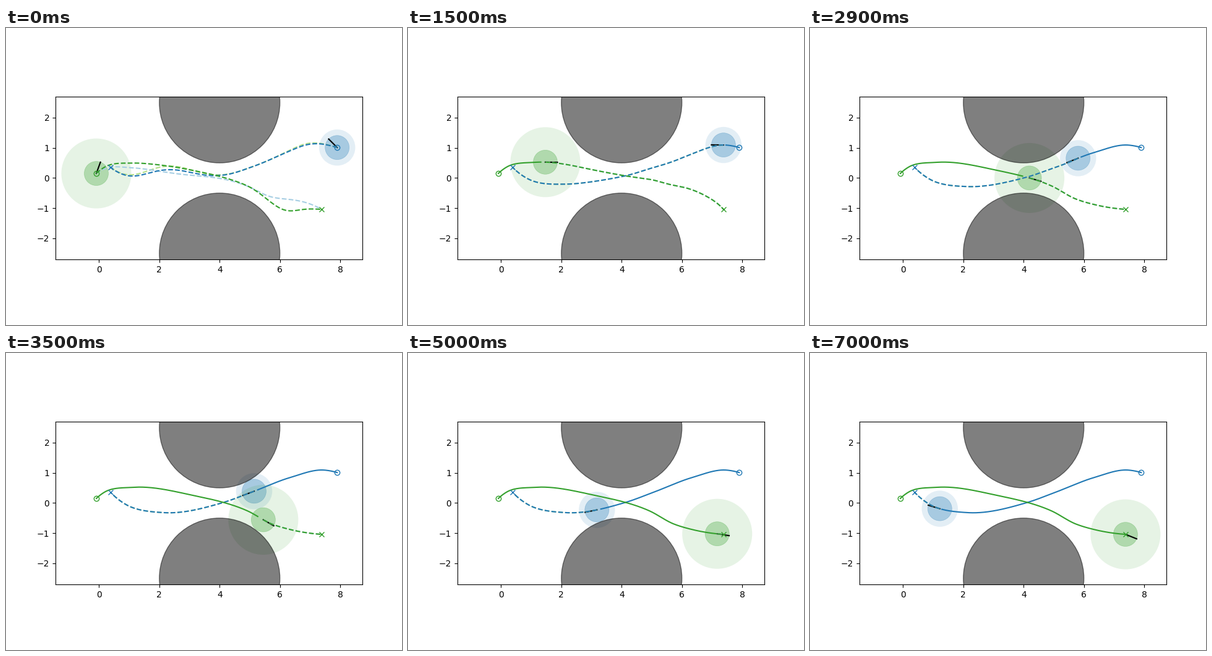
Write a matplotlib script that moves like this. It is 640 px wide and 480 px high and loops after 7100 ms.

```python
import numpy as np
import matplotlib.pyplot as plt
from matplotlib.animation import FuncAnimation
from matplotlib.patches import Circle

FRAMES = 71
INTERVAL = 100
HEADING = 0.4
KEY_FRAMES = 0, 15, 24, 35, 43, 58, 70
SETTLE = 5      # frames until the first plans are replaced
REVISE = 15     # frame from which the settled plans bend to the driven path

BLUE, LIGHT_BLUE = "#1f78b4", "#a6cee3"
GREEN, LIGHT_GREEN = "#33a02c", "#b2df8a"


def spline(knots, values, t):
    """Smooth cubic interpolation with parabolic slopes."""
    knots, values = np.array(knots, float), np.array(values, float)
    slopes = np.gradient(values, knots, edge_order=2)
    i = np.clip(np.searchsorted(knots, t, side="right") - 1, 0,
                len(knots) - 2)
    h = knots[i + 1] - knots[i]
    u = (t - knots[i]) / h
    v = 1 - u
    return (v * v * ((1 + 2 * u) * values[i] + u * h * slopes[i])
            + u * u * ((1 + 2 * v) * values[i + 1] - v * h * slopes[i + 1]))


def curve(points):
    """y as a function of x along a smooth curve through the points."""
    xs, ys = np.array(sorted(points)).T
    length = np.append(0, np.cumsum(np.hypot(np.diff(xs), np.diff(ys))))
    t = np.linspace(0, length[-1], 600)
    x, y = spline(length, xs, t), spline(length, ys, t)
    return lambda at: np.interp(at, x, y)


def bumps(terms, x):
    """Sum of bell shapes given as (centre, height, width)."""
    return sum(height * np.exp(-((x - centre) / width) ** 2 / 2)
               for centre, height, width in terms)


def fade(frame, start, end):
    return np.clip((end - frame) / (end - start), 0, 1)


class Agent:
    """A disc on its driven path, its plan and the other agent's guess of it.

    Plans are the driven path plus bumps, pinned at the agent and the goal.
    """

    def __init__(self, ax, color, light, radius, points, keys, start_angle,
                 parked, first, guess, settled, revised):
        self.path = curve(points)
        self.keys = keys
        self.start, self.goal = points[0][0], points[-1][0]
        self.start_heading = np.exp(1j * np.radians(start_angle))
        self.parked = parked
        self.first, self.guess, self.settled = first, guess, settled
        self.revised = revised
        self.discs = [
            ax.add_patch(Circle((0, 0), r, color=color, alpha=alpha, lw=lw))
            for r, alpha, lw in ((radius, 0.12, 0), (0.4, 0.3, 0.5))]
        self.nose, = ax.plot([], [], color="k", zorder=2)
        self.other, = ax.plot([], [], "--", color=light, zorder=2.1)
        self.plan, = ax.plot([], [], "--", color=color, zorder=2.2)
        self.trail, = ax.plot([], [], color=color, zorder=2.3)
        for (x, y), marker in zip((points[0], points[-1]), "ox"):
            ax.plot(x, y, marker, color=color, markerfacecolor="none",
                    zorder=2.4)

    def x(self, frame):
        low, high = sorted((self.start, self.goal))
        return np.clip(spline(KEY_FRAMES, self.keys, frame), low, high)

    def heading(self, frame, x):
        """Unit vector along the path, eased in from the start direction."""
        low, high = sorted((self.start, self.goal))
        x = np.clip(x, low + 0.02, high - 0.02)
        step = np.copysign(0.02, self.goal - self.start)
        tangent = step + 1j * (self.path(x + step) - self.path(x - step)) / 2
        early = np.exp(-frame / 4)
        turn = (1 - early) * tangent / abs(tangent)
        turn += early * self.start_heading
        turn *= np.exp(-1j * np.radians(0.75 * max(0, frame - self.parked)))
        return turn / abs(turn)

    def draw_plan(self, line, frame, first, revised):
        x0 = self.x(frame)
        x = np.linspace(x0, self.goal, 200)
        early = fade(frame, 0, SETTLE)
        offset = early * bumps(first, x)
        offset += ((1 - early) * fade(frame, REVISE, revised)
                   * bumps(self.settled, x))
        pins = ((1 - np.exp(-np.abs(x - x0) / 0.2))
                * (1 - np.exp(-np.abs(x - self.goal) / 0.2)))
        line.set_data(x, self.path(x) + offset * pins)

    def update(self, frame):
        x = self.x(frame)
        y = self.path(x)
        for disc in self.discs:
            disc.center = x, y
        nose = HEADING * self.heading(frame, x)
        self.nose.set_data([x, x + nose.real], [y, y + nose.imag])
        own, others = self.revised
        self.draw_plan(self.plan, frame, self.first, own)
        self.draw_plan(self.other, frame, self.guess, others)
        # the trail lags one step behind
        past = np.linspace(self.start, self.x(max(frame - 1, 0)), 300)
        self.trail.set_data(past, self.path(past))


fig, ax = plt.subplots(figsize=(6.4, 4.8), dpi=100)
ax.set_aspect("equal")
ax.set_xlim(-1.444, 8.737)
ax.set_ylim(-2.7, 2.7)
ax.set_xticks(range(0, 9, 2))
ax.set_yticks(range(-2, 3))

agents = [
    Agent(ax, BLUE, LIGHT_GREEN, 0.6,
          points=[(7.9, 1.01), (7.49, 1.09), (6.34, 0.845), (5.145, 0.39),
                  (4.1, 0.01), (2.15, -0.32), (0.916, -0.064),
                  (0.38, 0.357)],
          keys=(7.9, 7.38, 6.34, 5.145, 4.1, 2.23, 1.22),
          start_angle=135, parked=FRAMES,
          first=[(2.35, 0.6, 0.88), (6.77, 0.09, 0.45)],
          guess=[(2.35, 0.72, 0.88), (6.77, 0.13, 0.45)],
          settled=[(2.76, 0.14, 1), (5.85, -0.07, 0.5)],
          revised=(35, 35)),
    Agent(ax, GREEN, LIGHT_BLUE, 1.16,
          points=[(-0.09, 0.15), (0.2, 0.37), (1.12, 0.52), (3.11, 0.255),
                  (4.92, -0.26), (5.74, -0.7), (6.36, -0.885),
                  (7.38, -1.04)],
          keys=(-0.09, 1.47, 3.11, 5.45, 6.66, 7.37, 7.38),
          start_angle=70, parked=46,
          first=[(6.17, -0.23, 0.41), (1.74, -0.045, 0.6)],
          guess=[(2.05, -0.25, 1.2), (6.67, 0.19, 0.65)],
          settled=[(6.15, 0.5, 0.95)],
          revised=(23, 29)),
]
for y in (2.5, -2.5):
    ax.add_patch(Circle((4, y), 2, color="k", alpha=0.5))


def draw(frame):
    for agent in agents:
        agent.update(frame)


anim = FuncAnimation(fig, draw, frames=FRAMES, interval=INTERVAL,
                     init_func=lambda: draw(0), repeat=True, repeat_delay=0)
plt.show()
```
